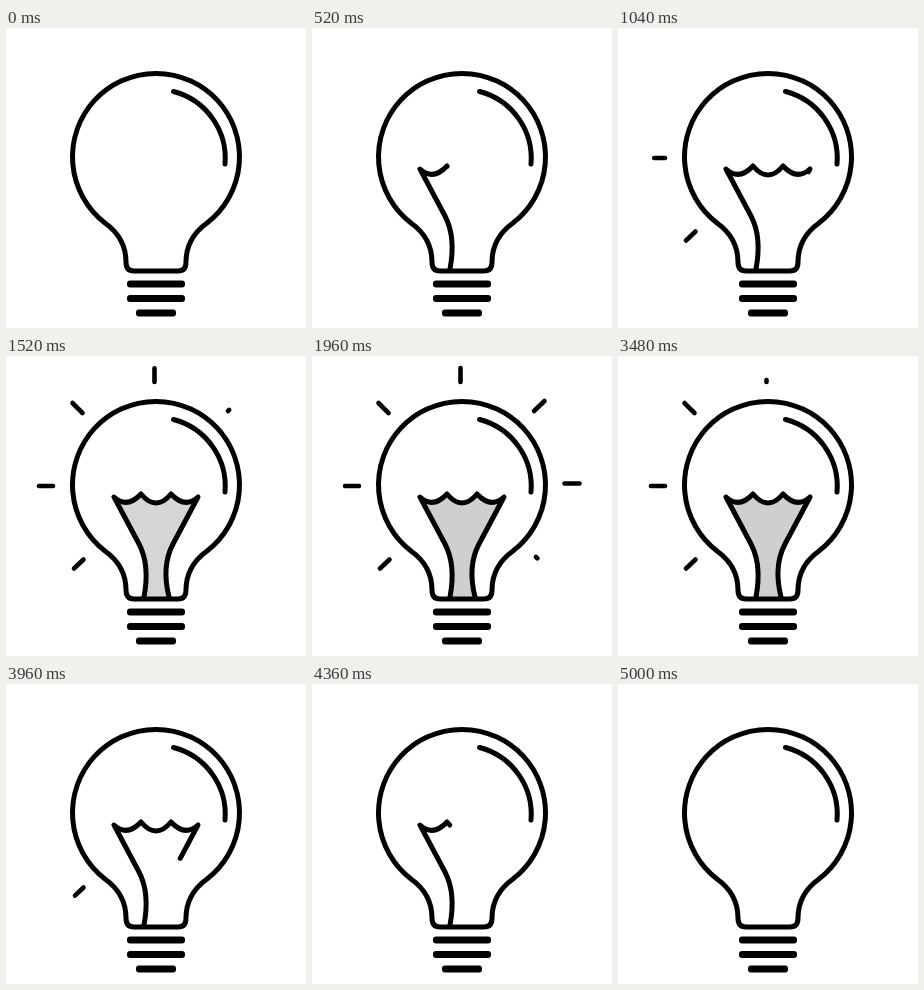
An HTML page that plays this animation: 300 px wide and 300 px high, repeating every 5040 ms.

```html
<!DOCTYPE html>
<html lang="en">
<head>
<meta charset="utf-8">
<title>Light bulb</title>
<style>
  html, body { margin: 0; height: 100%; overflow: hidden; background: #fff; }
  svg { display: block; width: 100vw; height: 100vh; }
</style>
</head>
<body>
<svg viewBox="0 0 300 300" fill="none" stroke="#000" stroke-width="5" stroke-linecap="round" stroke-linejoin="round">
  <path id="glow" fill="#cfcfcf" stroke="none"/>
  <path id="filament" pathLength="312"/>
  <path d="M128 243Q120 243 120 234C120 218 113 205 99 195A83.5 83.5 0 1 1 201 195C187 205 180 218 180 234Q180 243 172 243Z"/>
  <path d="M167.5 63.5A69 69 0 0 1 219 136"/>
  <g fill="#000" stroke="none">
    <rect x="121" y="252.5" width="58" height="7" rx="3"/>
    <rect x="121" y="267" width="58" height="7" rx="3"/>
    <rect x="130" y="281.5" width="40" height="7" rx="3"/>
  </g>
  <g id="rays" stroke-width="4.6"></g>
</svg>
<script>
const LOOP = 5040, STEP = 40, RAY_TIME = 260, RETRACT_TIME = 280;
const glow = document.getElementById('glow');
const filament = document.getElementById('filament');
const shape = 'M138 241C141 225 142 205 133 188L108 141Q121 153 135 138Q150 156 165 138Q179 153 192 141L167 188C158 205 159 225 163 241';
glow.setAttribute('d', shape + 'Z');
filament.setAttribute('d', shape);

// Inner point, outer point, start of growth, end of retraction
const rays = [
  [77.5, 203.5, 68, 212.5, 640, 4150],
  [47, 130, 33, 130, 905, 3860],
  [76.5, 57, 66.5, 47, 1110, 3740],
  [148.5, 26, 148.5, 12, 1300, 3500],
  [222, 55, 232.5, 45, 1505, 3250],
  [252.5, 127.5, 267.5, 127.5, 1690, 3080],
  [224, 201, 233.5, 210.5, 1940, 2915]
].map(([x1, y1, x2, y2, start, end]) => {
  const line = document.createElementNS('http://www.w3.org/2000/svg', 'line');
  line.setAttribute('x1', x1);
  line.setAttribute('y1', y1);
  document.getElementById('rays').append(line);
  return { line, x1, y1, x2, y2, start, end };
});

// [time, value] keys
const drawnKeys = [[30, 0], [430, 112], [560, 150], [1040, 208], [1440, 312],
  [3690, 312], [4280, 160], [4360, 142], [4840, 45], [4995, 0]];
const glowKeys = [[1100, 0], [1580, 1], [3500, 1], [3760, 0]];

const clamp = v => Math.min(1, Math.max(0, v));

function interpolate(keys, t) {
  const i = keys.findIndex(([time]) => time > t);
  if (i <= 0) return 0;
  const [t0, v0] = keys[i - 1], [t1, v1] = keys[i];
  return v0 + (v1 - v0) * (t - t0) / (t1 - t0);
}

function show(shape, visible) {
  shape.style.visibility = visible ? 'visible' : 'hidden';
}

function draw(now) {
  const t = Math.floor(now % LOOP / STEP) * STEP;

  const drawn = interpolate(drawnKeys, t);
  filament.setAttribute('stroke-dasharray', `${drawn} 400`);
  show(filament, drawn > 0);
  glow.style.opacity = interpolate(glowKeys, t);

  for (const { line, x1, y1, x2, y2, start, end } of rays) {
    const grow = clamp((t - start) / RAY_TIME);
    const retract = clamp((t - end) / RETRACT_TIME + 1);
    const reach = 1 - (1 - grow) ** 2 - retract ** 2;
    line.setAttribute('x2', x1 + (x2 - x1) * reach);
    line.setAttribute('y2', y1 + (y2 - y1) * reach);
    show(line, reach > 0);
  }
  requestAnimationFrame(() => draw(performance.now() - origin));
}

const origin = performance.now();
draw(0);
</script>
</body>
</html>
```
